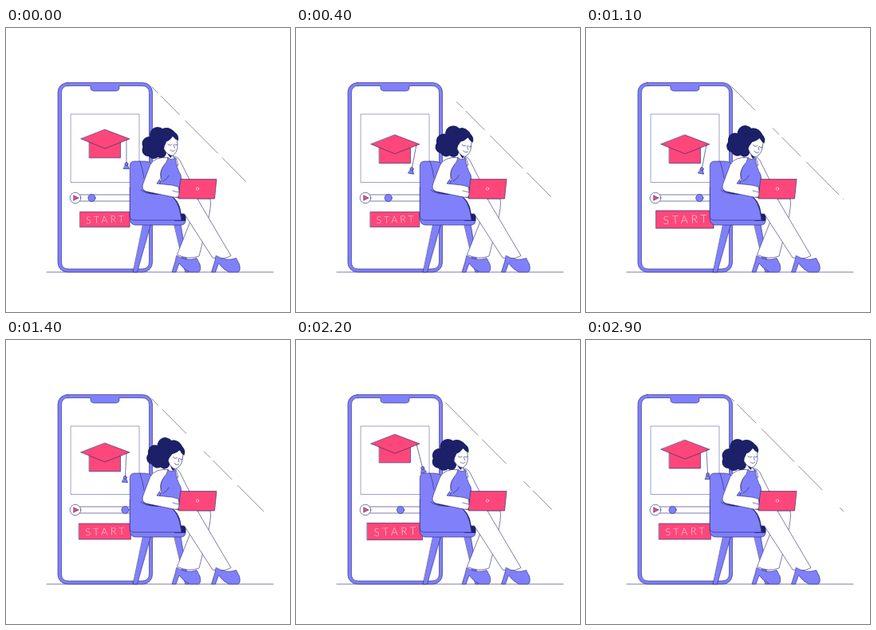
An HTML page for the animation above (3 s loop, 356 px wide and 356 px high).

```html
<!DOCTYPE html>
<html lang="en">
<head>
<meta charset="utf-8">
<title>Online course</title>
<style>
  html, body { margin: 0; width: 100%; height: 100%; overflow: hidden; background: #fff; }
  svg { display: block; width: 100%; height: 100%; stroke: #24246f; stroke-width: .6; stroke-linejoin: round; stroke-linecap: round; }
  .violet { fill: #8080fb; }
  .pink { fill: #fd477a; }
  .navy { fill: #1b2068; }
  .white { fill: #fff; }
  .line { fill: none; }
  text { font: 300 13px Lato, sans-serif; letter-spacing: 3.4px; fill: #fff; fill-opacity: .8; stroke: none; }
</style>
</head>
<body>
<svg viewBox="0 0 356 356">
  <path class="line" d="M51 306H335"/>
  <path id="signal" class="line" d="M182.500 73.500 323 215" pathLength="140" stroke="#333" stroke-width=".55"
        stroke-linecap="butt" stroke-dasharray="8 3.5 23.5 7 41 5 30 22"/>

  <!-- phone -->
  <rect class="violet" x="65" y="68.500" width="118.500" height="237.500" rx="12"/>
  <path class="white" d="M78 72.500H106V75Q106 79 111 79H137Q142 79 142 75V72.500H170Q179.500 72.500 179.500 81.500V293Q179.500 302 170 302H78Q69.500 302 69.500 293V81.500Q69.500 72.500 78 72.500Z"/>
  <rect class="line" x="81.500" y="108" width="85.500" height="85.500" stroke="#6060a8"/>
  <rect class="white" x="90" y="209" width="72" height="8"/>
  <circle class="white" cx="87" cy="213" r="6.800"/>
  <path class="pink" d="M85 210 91 213 85 216Z"/>
  <circle id="knob" class="violet" cy="213" r="4.600"/>

  <g id="cap">
    <path class="pink" d="M104.500 139H143.500V162.800H104.500Z"/>
    <path class="pink" d="M124 127.300 155 139 124 151 94 139Z"/>
    <g id="tassel">
      <path class="line" d="M151 140V169"/>
      <path class="violet" d="M150 171H152L154.500 176.500H147.500Z"/>
      <circle class="violet" cx="151" cy="170.500" r="2"/>
    </g>
  </g>

  <g id="button">
    <rect class="pink" x="-33.200" y="-10.200" width="66.400" height="20.400"/>
    <text x="1.700" y="4.600" text-anchor="middle" transform="rotate(-2)">START</text>
  </g>

  <!-- chair -->
  <path class="violet" d="M172 246H181.500L164.500 306H159.500Z"/>
  <path class="violet" d="M211 246H219L229 306H225Z"/>
  <path class="violet" d="M155.300 173Q155.300 167 161 167H174Q187 168 190 182L198 206 225 234V241Q225 247 219 247H162Q155.300 246 155.300 239Z"/>
  <path class="line" d="M168 167Q171 175 173 188"/>
  <path class="navy" d="M169 203H205L225 234V241.500H212Z"/>
  <path class="violet" d="M155.300 200H169Q174 208 190 208.500H203Q217 213 220 241H162Q155.300 241 155.300 235Z" stroke="none"/>
  <path class="line" d="M155.300 200V237Q156 241 162 241H225M169 203Q174 208 190 208.500H203Q217 213 220 241"/>

  <!-- legs and shoes -->
  <path class="white" d="M240 214H256Q258 223 252 246L242 286Q228 291 214.500 284L234 235Z"/>
  <path class="white" d="M203 208.500Q217 213 219.500 233L223.500 233 259 288Q272 291 282 285.500L238 211Z"/>
  <path id="shoe" class="violet" d="M214 285.500Q227 293 239 288.500L243 296Q245 304 241.500 306H230Q223 303 217 295L213 306H208L212 293Z"/>
  <use href="#shoe" x="49.500"/>

  <!-- torso and arms -->
  <path class="white" d="M204 161Q214 159 218 166L231.500 193H219L207 174Z"/>
  <path class="white" d="M190 166Q198 164 199 160L200 152H209V160Q209 163 213 163L216 172H192Z"/>
  <path class="violet" d="M203 163Q208 166 212 163Q214 176 219 184Q221 190 218 198V213Q202 211 188 206L195 190Q192 180 198 172Z"/>
  <path class="white" d="M203 162.500Q186 161 180.500 172L171.500 196Q169.500 203 176 205L210 212Q217 213 218 209L216 199 208 197 189 195 194 188Q192 180 198 172Q202 168 203 162.500Z"/>
  <path class="line" d="M197 192Q202 190 204 185M209 204 217 206"/>

  <g id="head">
    <g class="navy" stroke="none">
      <circle cx="190" cy="134" r="10"/>
      <circle cx="201" cy="134" r="9"/>
      <circle cx="179.500" cy="145" r="9"/>
      <circle cx="178.500" cy="153" r="8"/>
      <circle cx="185" cy="156" r="8"/>
      <circle cx="194" cy="156" r="7"/>
      <circle cx="190" cy="146" r="11"/>
      <path d="M200 150H210L207 163Q202 160 200 150Z"/>
    </g>
    <path class="white" d="M199 142Q208 131 214.500 139L215 150Q214 157 209 160Q203 160 198 152Z"/>
    <path class="navy" d="M194 127Q205 122 212 131Q217 134 216 141Q212 140 209 135.500Q206 141 201 142.500Q200 147 196 150Z" stroke="none"/>
    <path class="line" d="M203 146Q206 148.500 208 146M211 146Q213 148 215 146M210 146.500 211.500 150.500M206 153Q209 156 212 153"/>
  </g>

  <path class="pink" d="M219 189.500 264 189.500 261.500 214 216.500 214Z"/>
  <circle class="line" cx="240" cy="201.500" r="1.700" stroke="#fff"/>
</svg>
<script>
  const LOOP = 3000, STEP = 100;
  const part = id => document.getElementById(id);
  const set = (id, name, value) => part(id).setAttribute(name, value);
  const clamp = x => Math.min(1, Math.max(0, x));
  const ramp = (t, from, to) => {
    const u = clamp((t - from) / (to - from));
    return u * u * (3 - 2 * u);
  };

  function draw(now) {
    const t = Math.floor(now % LOOP / STEP) * STEP;
    const turn = 2 * Math.PI * t / LOOP;
    const swing = Math.sin(turn);

    // there and back, between linear and sine easing
    const back = 1 - Math.abs(2 * t / LOOP - 1);
    const slide = .75 * (1 - Math.cos(turn)) / 2 + .25 * back;
    set('knob', 'cx', 107.5 + 43 * slide);

    set('cap', 'transform', `translate(0 ${9 * swing})`);
    set('tassel', 'transform', `rotate(${14.5 * swing} 151 139.5)`);

    const nod = ramp(t, 0, 600) - ramp(t, 1500, 2300);
    set('head', 'transform', `rotate(${13 * nod} 203 175)`);

    const pulse = 1 - .1 * Math.cos(2 * Math.PI * (t - 220) / 1500);
    set('button', 'transform', `translate(124 240) scale(${pulse})`);

    set('signal', 'stroke-dashoffset', -140 * t / LOOP);
    requestAnimationFrame(() => draw(performance.now()));
  }
  draw(performance.now());
</script>
</body>
</html>
```
